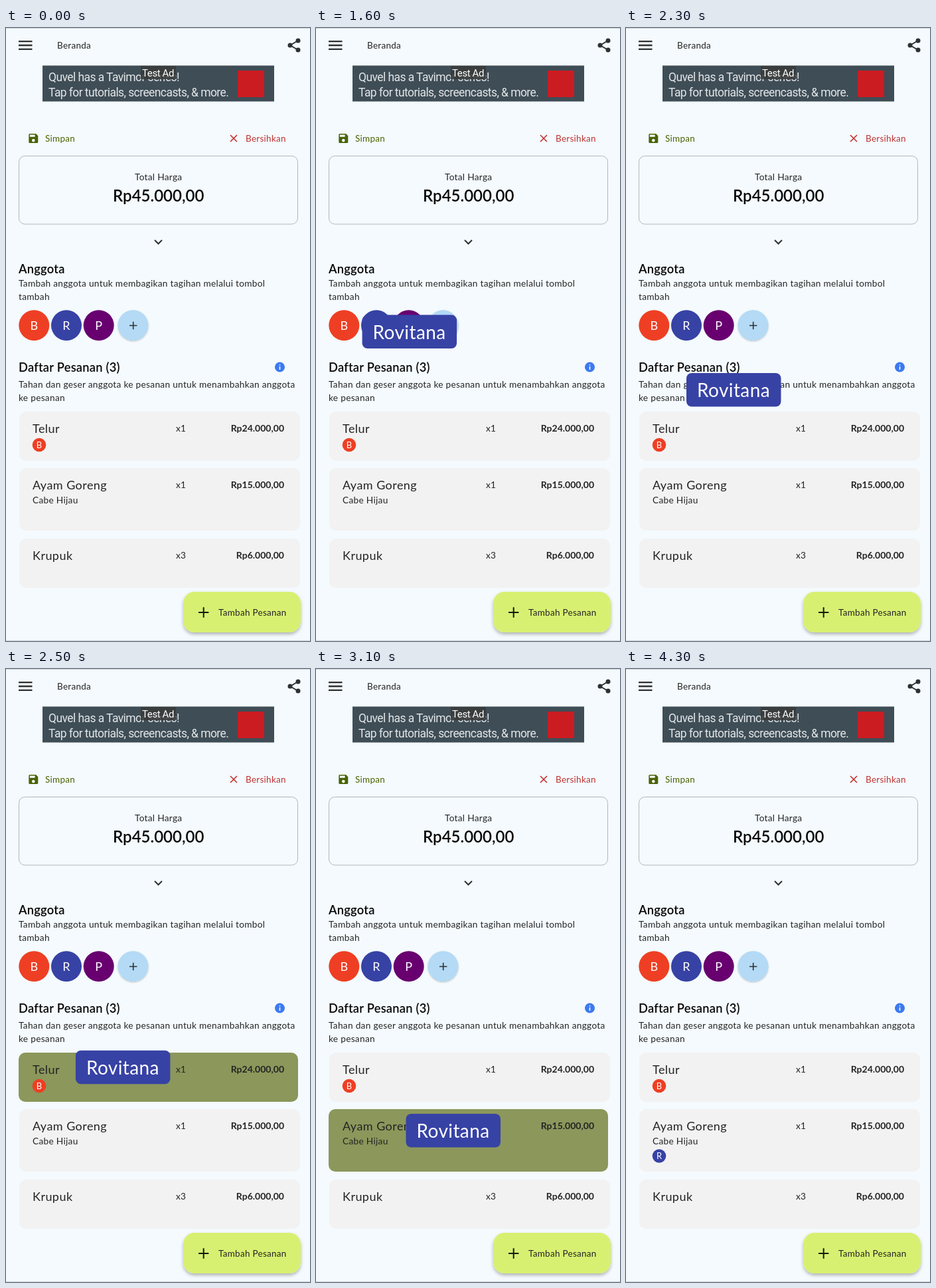
Animation of 458 by 922 pixels, one loop 4400 ms. Source, as an HTML page:

```html
<!DOCTYPE html>
<html lang="id">
<head>
<meta charset="utf-8">
<title>Beranda</title>
<style>
html, body { margin: 0; width: 100%; height: 100%; overflow: hidden; background: #f4fafd; }
svg { display: block; width: 458px; height: 922px; }
text { font-family: Lato, sans-serif; font-size: 13.7px; letter-spacing: .29px; fill: #242424; white-space: pre; }
.small { font-size: 13.5px; letter-spacing: .28px; }
.head { font-size: 18.3px; font-weight: 600; letter-spacing: .25px; fill: #080808; }
.total { font-size: 24px; font-weight: 600; letter-spacing: 0; fill: #080808; }
.dish { font-size: 18px; letter-spacing: .45px; }
.price { font-size: 14px; font-weight: 700; letter-spacing: 0; text-anchor: end; }
.mid { text-anchor: middle; }
.initial { font-size: 18px; letter-spacing: 0; text-anchor: middle; fill: #fff; }
.chip { font-size: 13px; letter-spacing: 0; text-anchor: middle; fill: #fff; }
.ad { font: 17.5px Roboto, sans-serif; letter-spacing: -.58px; fill: #e2e6e8; }
.badge { font: 15px Roboto, sans-serif; letter-spacing: -.4px; fill: #fff; }
.name { font-size: 28px; letter-spacing: .4px; fill: #fff; }
.line { fill: none; stroke: #2e3132; stroke-width: 2; }
.card { fill: #f2f2f2; }
.card.over { fill: #8b975b; }
</style>
</head>
<body>
<svg viewBox="0 0 458 922">
  <defs>
    <filter id="lift" x="-20%" y="-30%" width="140%" height="170%">
      <feDropShadow dx="0" dy="3" stdDeviation="2.5" flood-color="#000" flood-opacity=".28"/>
    </filter>
    <filter id="rise" x="-20%" y="-20%" width="140%" height="140%">
      <feDropShadow dx="0" dy="1" stdDeviation=".8" flood-color="#000" flood-opacity=".25"/>
    </filter>
  </defs>
  <rect width="458" height="922" fill="#f4fafd"/>
  <path d="M0 .5H458M0 921.5H458" stroke="#d2d6d8"/>

  <!-- App bar -->
  <path class="line" style="stroke-width:2.3" d="M19 20.2H39.5M19 26H39.5M19 31.8H39.5"/>
  <text class="small" x="77" y="31">Beranda</text>
  <path class="line" d="M440 19L428 26L440 33"/>
  <g fill="#2e3132">
    <circle cx="440" cy="19" r="3.5"/><circle cx="428" cy="26" r="3.5"/><circle cx="440" cy="33" r="3.5"/>
  </g>

  <!-- Banner -->
  <rect x="55" y="56.5" width="349" height="54" fill="#3f4d56"/>
  <text class="ad" x="64" y="80">Quvel has a Tavimor series!</text>
  <text class="ad" x="64" y="103">Tap for tutorials, screencasts, &amp; more.</text>
  <rect x="349" y="64" width="40" height="40" fill="#cb1c22"/>
  <rect x="203" y="57" width="53" height="20" fill="#3a3c3b" opacity=".88"/>
  <text class="badge" x="205" y="72.5">Test Ad</text>

  <!-- Actions and total -->
  <path transform="translate(32 156.7) scale(.775)" fill="#4a6300" d="M17 3H5a2 2 0 0 0-2 2v14a2 2 0 0 0 2 2h14a2 2 0 0 0 2-2V7l-4-4zm-5 16a3 3 0 1 1 0-6 3 3 0 0 1 0 6zm3-10H5V5h10v4z"/>
  <text class="small" x="59" y="171" style="fill:#4a6300">Simpan</text>
  <path class="line" style="stroke:#c0302f;stroke-width:1.6" d="M338 161L348 171M348 161L338 171"/>
  <text class="small" x="361" y="171" style="fill:#c0302f">Bersihkan</text>
  <rect x="19.5" y="192.5" width="420" height="102.5" rx="9" fill="none" stroke="#b3b8ba"/>
  <text class="mid" x="229.7" y="229">Total Harga</text>
  <text class="total mid" x="229.7" y="260.5">Rp45.000,00</text>
  <path class="line" d="M224 319L229.5 324.5L235 319"/>

  <!-- Members -->
  <text class="head" x="19" y="368.5">Anggota</text>
  <text x="19" y="389">Tambah anggota untuk membagikan tagihan melalui tombol</text>
  <text x="19" y="408.5">tambah</text>
  <g transform="translate(42.3 447.3)"><circle r="23" fill="#ee3f24"/><text class="initial" y="7">B</text></g>
  <g id="member"><circle r="23" fill="#3742a5"/><text class="initial" y="7">R</text></g>
  <g transform="translate(139.7 447.3)"><circle r="23" fill="#68006f"/><text class="initial" y="7">P</text></g>
  <circle cx="191.5" cy="447.3" r="23" fill="#b4daf5" filter="url(#rise)"/>
  <path class="line" style="stroke-width:1.6" d="M186 447.5H197.4M191.7 441.8V453.2"/>

  <!-- Orders -->
  <text class="head" x="19" y="517">Daftar Pesanan (3)</text>
  <circle cx="412.5" cy="510" r="7.5" fill="#3c7af0"/>
  <path d="M412.5 509V514M412.5 506V507.6" stroke="#fff" stroke-width="1.5"/>
  <text x="19" y="541">Tahan dan geser anggota ke pesanan untuk menambahkan anggota</text>
  <text x="19" y="560.5">ke pesanan</text>

  <rect class="card" x="20" y="577" width="423" height="74" rx="10"/>
  <text class="dish" x="40" y="608.5">Telur</text>
  <text x="256" y="606.5">x1</text>
  <text class="price" x="419" y="606.5">Rp24.000,00</text>
  <g transform="translate(50 627)"><circle r="10.3" fill="#ee3f24"/><text class="chip" y="4.8">B</text></g>

  <rect class="card" x="20" y="662" width="423" height="94" rx="10"/>
  <text class="dish" x="40" y="694">Ayam Goreng</text>
  <text x="40" y="714.5">Cabe Hijau</text>
  <text x="256" y="692">x1</text>
  <text class="price" x="419" y="692">Rp15.000,00</text>
  <g id="added" transform="translate(50 732.5)"><circle r="10.3" fill="#3742a5"/><text class="chip" y="4.8">R</text></g>

  <rect class="card" x="20" y="768" width="423" height="74" rx="10"/>
  <text class="dish" x="40" y="799.5">Krupuk</text>
  <text x="256" y="797.5">x3</text>
  <text class="price" x="419" y="797.5">Rp6.000,00</text>

  <rect x="267" y="848" width="177" height="61" rx="17" fill="#d8f072" filter="url(#lift)"/>
  <path class="line" style="stroke:#161a08" d="M290 879H305.4M297.7 871.3V886.7"/>
  <text class="small" x="320" y="884">Tambah Pesanan</text>

  <g id="tag">
    <rect width="142.5" height="50.5" rx="8" fill="#3742a5"/>
    <text class="name" x="16" y="36">Rovitana</text>
  </g>
</svg>
<script>
const LOOP = 4400, STEP = 100, GRAB = 1500, DROP = 3500;
const byId = id => document.getElementById(id);
const member = byId('member'), tag = byId('tag'), added = byId('added');
const cards = document.querySelectorAll('.card');

// Drag path: time, left, top
const path = [
  [1400, 68, 424], [1900, 76, 460], [2300, 91, 519],
  [2700, 119, 626.5], [3100, 135.5, 669], [3500, 138, 674]
];

function slope(i, axis) {
  if (i === 0 || i === path.length - 1) return 0;
  const a = path[i - 1], b = path[i + 1];
  return (b[axis] - a[axis]) / (b[0] - a[0]);
}

// Cubic Hermite through the path points
function along(t, axis) {
  let i = 0;
  while (i < path.length - 2 && t >= path[i + 1][0]) i++;
  const [a, b] = [path[i], path[i + 1]], d = b[0] - a[0], u = (t - a[0]) / d, v = 1 - u;
  return v * v * (1 + 2 * u) * a[axis] + u * u * (3 - 2 * u) * b[axis]
    + d * u * v * (v * slope(i, axis) - u * slope(i + 1, axis));
}

const clamp = v => Math.max(0, Math.min(1, v));
const show = (el, on) => el.style.display = on ? '' : 'none';

function highlight(card, on) {
  card.classList.toggle('over', on);
  card.setAttribute('x', on ? 19 : 20);
  card.setAttribute('width', on ? 421 : 423);
}

function draw(t) {
  const press = Math.min(clamp((t - 900) / 150), clamp((1500 - t) / 150));
  member.setAttribute('transform', `translate(91 447.3) scale(${1 - .1 * press})`);

  const dragging = t >= GRAB && t < DROP;
  const x = along(t, 1), y = along(t, 2), pointer = y + 27;
  show(tag, dragging);
  if (dragging) tag.setAttribute('transform', `translate(${x} ${y})`);
  highlight(cards[0], dragging && pointer > 577 && pointer < 651);
  highlight(cards[1], dragging && pointer > 662 && pointer < 756);
  show(added, t >= DROP);
}

const start = performance.now();
function frame() {
  const t = (performance.now() - start) % LOOP;
  draw(Math.floor(t / STEP) * STEP);
  requestAnimationFrame(frame);
}
frame();
</script>
</body>
</html>
```
